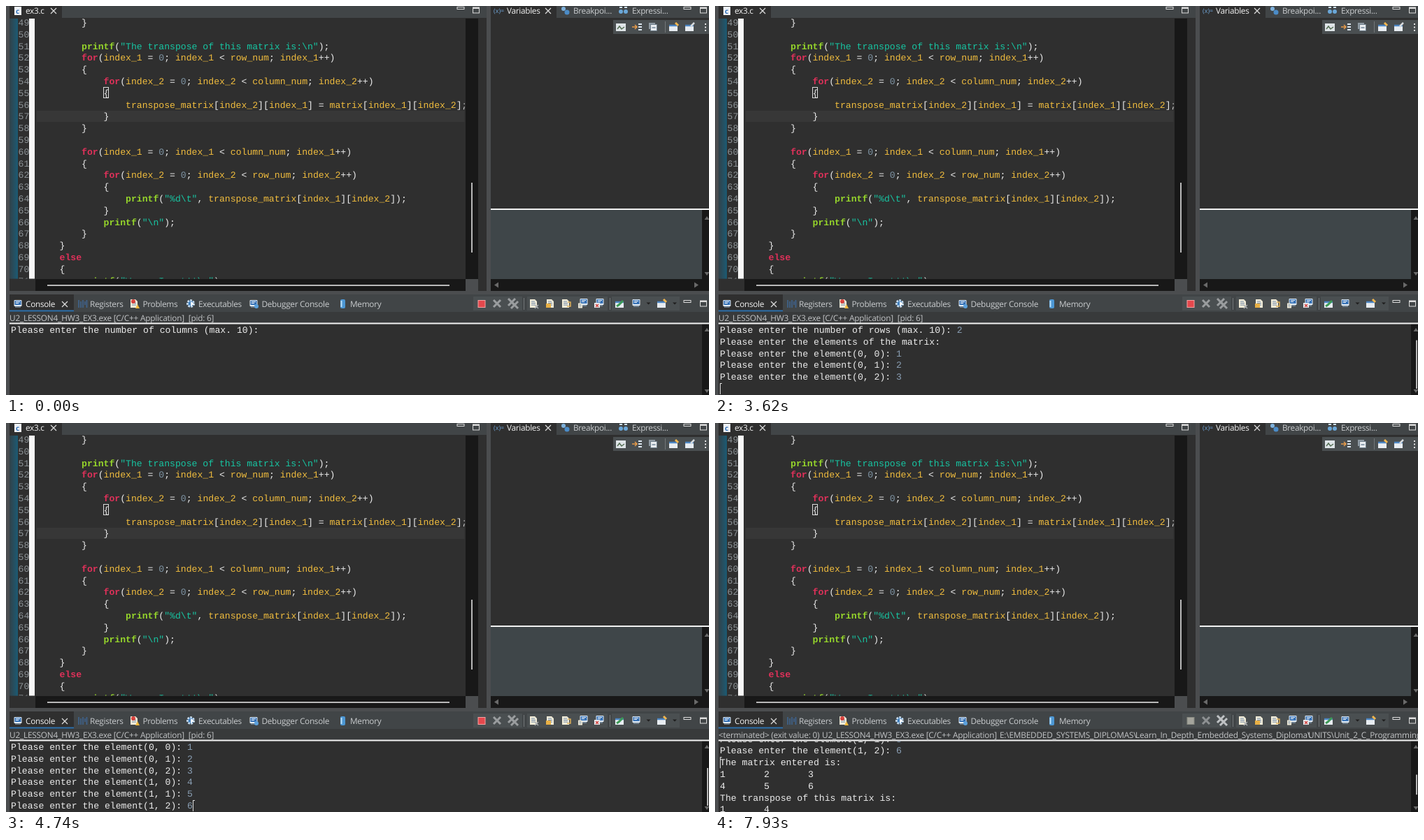
These frames come from a looping animation (1005 by 557 pixels, 8 s). An HTML page:

```html
<!DOCTYPE html>
<html lang="en">
<head>
<meta charset="utf-8">
<title>Matrix transpose</title>
<style>
html, body { margin: 0; width: 100%; height: 100%; overflow: hidden; background: #4b4d4f; }
svg { display: block; width: 100%; height: 100%; }
text { white-space: pre; text-rendering: geometricPrecision; }
.ui { font: 11.8px "Open Sans", "Noto Sans", sans-serif; letter-spacing: -.3px; fill: #c9ccce; }
.path { letter-spacing: -.2px; fill: #c2c4c6; }
.on { fill: #f2f2f2; }
.mono { font: 13.13px "Liberation Mono", monospace; fill: #ececec; }
.num { fill: #8c9296; }
.key { fill: #e0315a; font-weight: bold; }
.fn { fill: #96d62b; font-weight: bold; }
.id { fill: #f1bd3e; }
.str { fill: #17c6a3; }
.lit { fill: #7e93a3; }
.in { fill: #8a9fb4; }
.bg { fill: #2f2f2f; }
.tabs { fill: #414547; }
.bar { fill: #4a4f51; }
.track { fill: #181818; }
.thumb { fill: #b8b8b8; }
.line { fill: none; stroke: #dcdcdc; }
.arrow { fill: #6a6a6a; }
.done .running, svg:not(.done) .ended { display: none; }
</style>
</head>
<body>
<svg id="stage" viewBox="0 0 1005 557" preserveAspectRatio="none">
  <defs>
    <linearGradient id="ruler"><stop offset="0" stop-color="#33444c"/><stop offset="1" stop-color="#13688b"/></linearGradient>
    <pattern id="dots" width="2" height="2" patternUnits="userSpaceOnUse">
      <path d="M0 0h1v1h-1zM1 1h1v1h-1z" fill="#2f3b40" opacity=".6"/>
    </pattern>
    <clipPath id="codeClip"><rect x="5" y="18" width="650.500" height="372.500"/></clipPath>
    <clipPath id="outClip"><rect x="5" y="455.500" width="990" height="101.500"/></clipPath>
    <path id="close" d="M-4-4L4 4M4-4L-4 4" class="line" stroke-width="1.2"/>
    <path id="cross" d="M-5-5L5 5M5-5L-5 5" fill="none" stroke-width="3"/>
    <g id="min"><rect x="-5" y="-1.5" width="10" height="3" class="line"/></g>
    <g id="max"><rect x="-4.5" y="-4" width="9" height="8" class="line"/><path d="M-4.5-3h9" class="line" stroke-width="2"/></g>
    <g id="screen">
      <rect x="-5.5" y="-5" width="11" height="9" rx="1" fill="#e3edf6"/>
      <rect x="-4.5" y="-4" width="9" height="6" fill="#3470b5"/>
      <path d="M-3-2.500h6M-3-.5h4" stroke="#fff"/><path d="M-4 5h8" stroke="#9db7d0"/>
    </g>
    <g id="doc">
      <path d="M-5-6h7l3 3v9h-10z" fill="#f2ecd8"/>
      <path d="M-3-3h5M-3-.5h6M-3 2h6" stroke="#6b86a8"/>
    </g>
    <g id="window">
      <rect x="-6" y="-4" width="12" height="9" fill="#e8edf2"/><path d="M-6-3h12" stroke="#4c86c4" stroke-width="2.4"/>
    </g>
    <path id="down" d="M-3-1.5h6l-3 3z" fill="#1e1e1e"/>
  </defs>

  <rect width="1005" height="557" fill="#4b4d4f"/>

  <!-- editor -->
  <rect class="tabs" x="5" width="682" height="18"/>
  <rect class="bg" x="5" width="75" height="18"/>
  <rect class="bg" x="5" y="17" width="682" height="391"/>
  <rect x="12" y="1" width="10" height="12" fill="#eef2f7"/>
  <text x="14" y="11" style="font:bold 10px 'Open Sans',sans-serif" fill="#2b6cb8">c</text>
  <text class="ui on" x="28" y="11">ex3.c</text>
  <use href="#close" x="68" y="7"/>
  <use href="#min" x="650" y="3"/><use href="#max" x="672" y="6"/>
  <g clip-path="url(#codeClip)">
    <rect x="5" y="17" width="12" height="374" fill="url(#ruler)"/>
    <rect x="5" y="17" width="12" height="374" fill="url(#dots)"/>
    <rect x="33" y="17" width="8" height="374" fill="#f7f7f7"/>
    <rect x="44" y="150" width="613" height="16" fill="#373737"/>
    <rect x="139.5" y="116.500" width="7" height="15" class="line" stroke="#a8a8a8"/>
    <g id="code"></g>
  </g>
  <rect class="track" x="657" y="18" width="18" height="373"/>
  <rect class="track" x="42" y="391" width="615" height="17"/>
  <rect x="657" y="391" width="18" height="17" fill="#4b4d4f"/>
  <rect class="thumb" x="665" y="253" width="2" height="100"/>
  <rect class="thumb" x="59" y="399" width="575" height="2"/>

  <!-- variables -->
  <rect class="tabs" x="693" width="312" height="18"/>
  <rect class="bg" x="693" width="94" height="18"/>
  <rect class="bg" x="693" y="17" width="312" height="273"/>
  <rect class="bar" x="868" y="20" width="137" height="20"/>
  <text x="697" y="10" style="font:9px 'Open Sans',sans-serif" fill="#6fa3d4">(x)=</text>
  <text class="ui on" x="716" y="11">Variables</text>
  <use href="#close" x="775" y="7"/>
  <circle cx="797" cy="4" r="3" fill="#7fb2dd"/><circle cx="802" cy="9" r="3.5" fill="#4b8cc8"/>
  <text class="ui" x="811" y="11">Breakpoi...</text>
  <circle cx="879" cy="8" r="3" fill="#6aa7d8"/><circle cx="886" cy="8" r="3" fill="#6aa7d8"/>
  <path d="M877 2h4M884 2h4" stroke="#cfe0ee" stroke-width="2"/>
  <text class="ui" x="895" y="11">Expressi...</text>
  <use href="#min" x="974" y="3"/><use href="#max" x="997" y="6"/>
  <rect x="872" y="25" width="14" height="11" fill="#dfe5e8"/>
  <path d="M874 33l3-4 3 4 4-3" fill="none" stroke="#526c52" stroke-width="1.5"/>
  <path d="M895 30h7m-3-3l3 3-3 3" fill="none" stroke="#e59a4a" stroke-width="1.5"/>
  <path d="M904 26h5M904 30h5M904 34h5" stroke="#dbe6ef" stroke-width="2"/>
  <rect x="919" y="24" width="9" height="9" fill="#8f9aa2"/><rect x="921.5" y="26.500" width="9" height="9" fill="#e9edf0" stroke="#70808c"/><path d="M923.500 31h5" stroke="#35506b"/>
  <path d="M942.500 22v16" stroke="#737779"/>
  <use href="#window" x="954" y="31"/><path d="M957 24l4 4" stroke="#f0b64f" stroke-width="3"/>
  <use href="#window" x="977" y="31"/><path d="M979 29l5-5" stroke="#d5d9db" stroke-width="2.500"/>
  <path d="M999 25h2v2h-2zM999 29.500h2v2h-2zM999 34h2v2h-2z" fill="#e3e3e3"/>
  <rect x="693" y="292" width="302" height="99" fill="#3f4649"/>
  <rect x="693" y="290" width="312" height="2" fill="#f2f2f2"/>
  <rect class="track" x="995" y="292" width="10" height="116"/>
  <rect class="track" x="693" y="391" width="312" height="17"/>
  <path class="arrow" d="M704 395.500v8l-6-4zM984 395.500v8l6-4zM998.500 306h7l-3.500-5zM998.500 381h7l-3.500 5z"/>

  <!-- console -->
  <rect class="tabs" x="5" y="413" width="1000" height="25"/>
  <rect class="bg" x="5" y="413" width="92" height="25"/>
  <rect x="5" y="435.500" width="92" height="2" fill="#2f72ad"/>
  <use href="#screen" x="17" y="426"/>
  <text class="ui on" x="28" y="431">Console</text>
  <use href="#close" x="84" y="427"/>
  <path d="M104 421v11M107 423v9M110 421v11M113 423v5M115.500 421v11" stroke="#3f6593" stroke-width="1.500"/>
  <text class="ui" x="120" y="431">Registers</text>
  <use href="#doc" x="183" y="426"/>
  <circle cx="182" cy="423" r="3" fill="#d8433f"/><path d="M185 433l3-6 3 6z" fill="#efb93c"/>
  <text class="ui" x="195.500" y="431">Problems</text>
  <circle cx="264" cy="426" r="4.500" fill="#3f7fbd" stroke="#c9dced" stroke-width="3" stroke-dasharray="2.500 1.500"/>
  <path d="M264 423l5 3.500-5 3.500z" fill="#fff"/>
  <text class="ui" x="275" y="431">Executables</text>
  <use href="#screen" x="354" y="426"/><circle cx="358" cy="430" r="3" fill="#5ba0dc"/>
  <text class="ui" x="365.500" y="431">Debugger Console</text>
  <rect x="478" y="420" width="7" height="13" rx="2" fill="#4c97d4"/><path d="M479.500 422v9" stroke="#b9dcf5" stroke-width="2"/>
  <text class="ui" x="492" y="431">Memory</text>

  <rect class="bar" x="668" y="416" width="70" height="20"/>
  <rect class="bar" x="745" y="416" width="115" height="20"/>
  <rect class="bar" x="866" y="416" width="97" height="20"/>
  <path d="M740.500 418v17M863.500 418v17" stroke="#73777a"/>
  <g class="running">
    <rect x="675" y="421.500" width="10" height="10" fill="#e5484d" stroke="#f3a3a3"/>
    <use href="#cross" x="702" y="426" stroke="#9a9d9f"/>
    <g stroke="#9a9d9f"><use href="#cross" x="723" y="424"/><use href="#cross" x="727" y="428"/></g>
  </g>
  <g class="ended">
    <rect x="675" y="421.500" width="10" height="10" fill="#a4a49c" stroke="#85877f"/>
    <use href="#cross" x="702" y="426" stroke="#8e9193"/>
    <g stroke="#bfc2c4"><use href="#cross" x="723" y="424"/><use href="#cross" x="727" y="428"/></g>
  </g>
  <use href="#doc" x="754" y="426"/><path d="M756 428l5 5m0-5l-5 5" stroke="#a9adb0" stroke-width="1.500"/>
  <use href="#doc" x="778" y="426"/><rect x="772" y="426" width="7" height="6" fill="#e8b045"/>
  <use href="#doc" x="800" y="426"/><path d="M803 424h4v6h-5" fill="none" stroke="#e0b25c" stroke-width="1.500"/>
  <use href="#screen" x="826" y="424"/><use href="#doc" transform="translate(821 429) scale(.6)"/>
  <use href="#screen" x="849" y="424"/><rect x="841" y="425" width="8" height="7" fill="#e9edf0"/><path d="M843 427l4 4m0-4l-4 4" stroke="#d4433f" stroke-width="1.500"/>
  <use href="#window" x="877" y="427"/><path d="M873 430l3-2 6-6" fill="none" stroke="#3d9a56" stroke-width="3"/>
  <use href="#screen" x="901" y="425"/><use href="#down" x="918.500" y="426"/>
  <use href="#window" x="937" y="427"/><path d="M940 420l4 4" stroke="#f0b64f" stroke-width="3"/><use href="#down" x="956" y="426"/>
  <use href="#min" x="974" y="423"/><use href="#max" x="997" y="426"/>

  <rect x="5" y="438" width="1000" height="16" fill="#383a3b"/>
  <text class="ui path running" x="5" y="450.500">U2_LESSON4_HW3_EX3.exe [C/C++ Application]  [pid: 6]</text>
  <text class="ui path ended" y="450.500"><tspan x="5">&lt;terminated&gt; (exit value: 0)</tspan><tspan x="153">U2_LESSON4_HW3_EX3.exe [C/C++ Application]</tspan><tspan x="407">E:\EMBEDDED_SYSTEMS_DIPLOMAS\</tspan><tspan x="601">Learn_In_Depth_Embedded_Systems_Diploma\</tspan><tspan x="848">UNITS\Unit_2_C_Programming\</tspan></text>
  <rect class="bg" x="5" y="455" width="990" height="102"/>
  <rect class="track" x="995" y="455" width="10" height="102"/>
  <path class="arrow" d="M998.500 466h7l-3.500-5zM998.500 549h7l-3.500 5z"/>
  <rect id="thumb" class="thumb" x="1002" width="2"/>
  <rect x="5" y="453.500" width="1000" height="2" fill="#f2f2f2"/>
  <g clip-path="url(#outClip)">
    <g id="out">
      <g id="lines"></g>
      <path id="caret" d="M.5-12.500v16M0-12h3" class="line"/>
    </g>
  </g>
</svg>

<script>
const $ = id => document.getElementById(id);
const CHAR = 7.878, ROW = 16.8, VIEW = 6, LOOP = 8000;
const esc = s => s.replace(/&/g, '&amp;').replace(/</g, '&lt;');
const span = (cls, s) => `<tspan class="${cls}">${esc(s)}</tspan>`;

// Code listing, from line 49; each tab is one level of four columns
const code = String.raw`		}

		printf("The transpose of this matrix is:\n");
		for(index_1 = 0; index_1 < row_num; index_1++)
		{
			for(index_2 = 0; index_2 < column_num; index_2++)
			{
				transpose_matrix[index_2][index_1] = matrix[index_1][index_2];
			}
		}

		for(index_1 = 0; index_1 < column_num; index_1++)
		{
			for(index_2 = 0; index_2 < row_num; index_2++)
			{
				printf("%d\t", transpose_matrix[index_1][index_2]);
			}
			printf("\n");
		}
	}
	else
	{
		printf("Wrong Input!!\n");`;

function paint(s) {
  return s.replace(/"[^"]*"|[a-z_]\w*|\d+|[^"\w]+/gi, t => {
    if (t[0] === '"') return span('str', t);
    if (/^(for|else)$/.test(t)) return span('key', t);
    if (t === 'printf') return span('fn', t);
    if (/^\d/.test(t)) return span('lit', t);
    return /^\w/.test(t) ? span('id', t) : esc(t);
  });
}

$('code').innerHTML = code.split('\n').map((s, i) => {
  const body = s.trimStart(), x = 45 + (s.length - body.length) * 4 * CHAR;
  const y = 28 + i * ROW;
  return `<text class="mono num" x="17.500" y="${y}">${49 + i}</text>` +
    `<text class="mono" x="${x}" y="${y}">${paint(body)}</text>`;
}).join('');

// Console session: time, text added, and options
const ask = s => `Please enter the ${s}: `;
const cell = (r, c) => ask(`element(${r}, ${c})`);
const result = `The matrix entered is:
1\t2\t3
4\t5\t6
The transpose of this matrix is:
1\t4
2\t5
3\t6
`;
const ended = { stay: 1, done: 1 };
const back = { ...ended, scroll: 8 * ROW - 5.5 };
const script = [
  [0, ask('number of columns (max. 10)'), { blink: 0 }],
  [680, ''],
  [1220, '', { blink: 0 }],
  [1710, '3'],
  [1850, '\n' + ask('number of rows (max. 10)')],
  [2170, '2'],
  [2300, '\nPlease enter the elements of the matrix:\n' + cell(0, 0)],
  [2760, '1'],
  [2890, '\n' + cell(0, 1)],
  [3090, '2'],
  [3290, '\n' + cell(0, 2)],
  [3490, '3'],
  [3620, '\n'],
  [3690, cell(1, 0), { stay: 1 }],
  [3950, '4'],
  [4080, '\n' + cell(1, 1)],
  [4340, '5'],
  [4480, '\n'],
  [4540, cell(1, 2), { stay: 1 }],
  [4740, '6'],
  [4880, '\n'],
  [4940, result, ended],
  [6860, '', back],
  [7390, '', { ...back, blink: 0 }],
  [7930, '', back]
];

let text = '', caret = [0, 0];
const states = script.map(([at, add, opt = {}]) => {
  const before = text.split('\n').length;
  text += add;
  const lines = text.split('\n'), last = lines.length - 1;
  // Enter puts the caret at the start of the next row; output leaves it there
  if (add[0] === '\n') caret = [0, before];
  else if (!opt.stay) caret = [lines[last].length, last];
  const scroll = opt.scroll ?? Math.max(0, lines.length - VIEW) * ROW;
  return { at, lines, caret, scroll, blink: opt.blink ?? 1, done: !!opt.done };
});

const untab = s => s.replace(/(\d)\t/g, '$1' + ' '.repeat(7));
const markInput = s => esc(untab(s)).replace(/(: )(\d)$/, (m, a, d) => a + span('in', d));

function show(s) {
  $('lines').innerHTML = s.lines.map((l, i) =>
    `<text class="mono" x="7" y="${468 + i * ROW}">${markInput(l)}</text>`).join('');
  $('out').setAttribute('transform', `translate(0 ${-s.scroll})`);
  const [col, row] = s.caret;
  $('caret').setAttribute('transform', `translate(${Math.round(7 + col * CHAR)} ${468 + row * ROW + .5})`);
  $('caret').style.display = s.blink ? '' : 'none';
  const n = s.lines.length, unit = 81 / n;
  $('thumb').setAttribute('y', 467 + s.scroll / ROW * unit);
  $('thumb').setAttribute('height', n > VIEW ? VIEW * unit : 0);
  $('stage').classList.toggle('done', s.done);
}

let shown;
function tick() {
  const t = performance.now() % LOOP;
  const s = states.findLast(v => v.at <= t);
  if (s !== shown) show(shown = s);
  requestAnimationFrame(tick);
}
tick();
</script>
</body>
</html>
```
